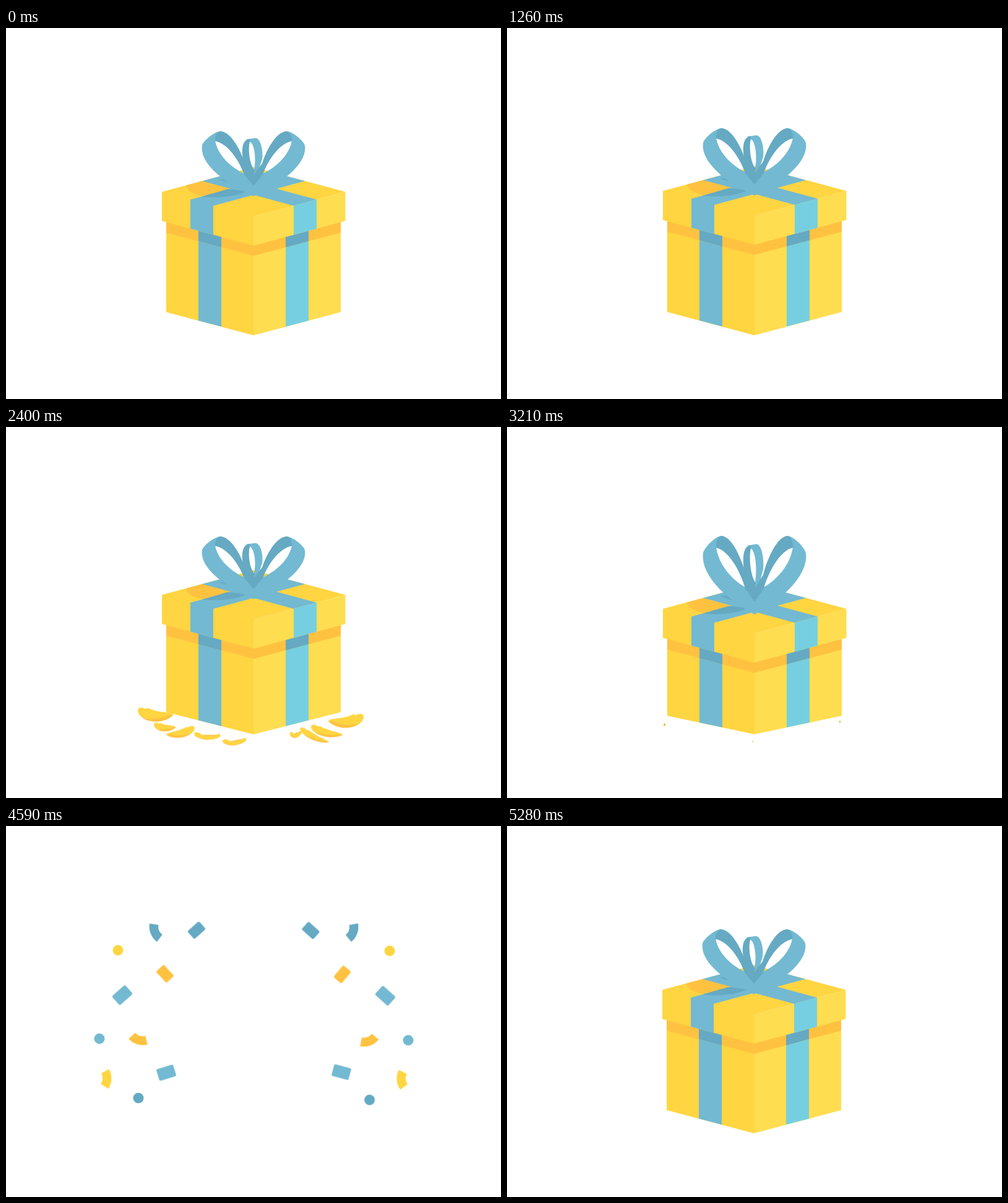
These frames come from a looping animation (800x600 px, 5310 ms). An HTML page without scripts:

```html
<!DOCTYPE html>
<html lang="en">
<head>
<meta charset="utf-8">
<title>Gift box</title>
<style>
@property --s { syntax: "<number>"; inherits: true; initial-value: 1; }
@property --bow { syntax: "<number>"; inherits: true; initial-value: 1; }

html, body { margin: 0; width: 100%; height: 100%; overflow: hidden; background: #fff; }
svg { display: block; width: 100vw; height: 100vh; }

.yellow { fill: #ffd541; }
.lemon { fill: #ffdd50; }
.orange { fill: #ffc240; }
.blue { fill: #73b9d2; }
.deep { fill: #65a9c3; }
.aqua { fill: #76cfe0; }

.hop, .squash, .confetti > *, .dust > *, .ring, .dots {
  animation: 5.31s linear infinite;
}

/* box */
.hop { animation-name: hop; }
.squash { animation-name: squash; animation-timing-function: ease-in-out; }
.body { transform-origin: 400px 497px; transform: scaleY(var(--s)); }
.lid { transform: translateY(calc((1 - var(--s)) * 145px)); }
.bow { transform-origin: 400px 262px; transform: scaleY(var(--bow)); }

@keyframes hop {
  0% { transform: none; }
  7.72%, 37.85% { transform: translate(0, 0); animation-timing-function: cubic-bezier(.333, .667, .667, 1); }
  11.86%, 42% { transform: translate(0, -160px); animation-timing-function: cubic-bezier(.333, 0, .667, .333); }
  13.56%, 43.69% { transform: translate(0, 0); }
  62.34% { transform: translate(0, 0); animation-timing-function: cubic-bezier(.333, .1, .667, .6); }
  65.16% { transform: translate(0, -520px); animation-timing-function: step-start; }
  65.17% { transform: translate(-570px, 0); }
  86.66% { transform: translate(-570px, 0); animation-timing-function: cubic-bezier(.333, .667, .667, 1); }
  100% { transform: translate(0, 0); }
}
@keyframes squash {
  0%, 1.13%, 31.26% { --s: 1; --bow: 1; }
  5.65%, 35.78% { --s: .8; --bow: 1.2; }
  6.78%, 36.91% { --s: .78; --bow: .95; }
  7.72%, 37.85% { --s: 1.08; --bow: .9; }
  11.86%, 42% { --s: 1; --bow: 1; }
  13.56%, 43.69% { --s: 1; --bow: 1.1; }
  14.12%, 44.26% { --s: .84; --bow: 1.15; }
  15.07%, 45.2% { --s: .955; --bow: .963; }
  16.76%, 46.89% { --s: 1.07; --bow: 1.03; }
  19.59%, 49.72% { --s: .96; --bow: .97; }
  21.85%, 51.98% { --s: 1.025; --bow: 1.085; }
  23.73%, 53.86% { --s: 1.01; --bow: 1.037; }
  26.55%, 56.69% { --s: 1; --bow: 1; }
  60.45% { --s: .8; --bow: 1.21; }
  61.77% { --s: .76; --bow: 1; }
  62.52% { --s: 1.08; --bow: .9; }
  65.16%, 100% { --s: 1; --bow: 1; }
}

/* confetti: --a and --p just after the burst, --z and --q once settled */
.confetti > * { animation-name: burst; animation-timing-function: cubic-bezier(.21, .54, .45, .89); }
@keyframes burst {
  0%, 62.3% { transform: translate(400px, 300px) rotate(0deg) scale(0); }
  72.88% { transform: translate(var(--a)) rotate(var(--p, 0deg)) scale(1); }
  86.44% { transform: translate(var(--z)) rotate(var(--q, 0deg)) scale(1); animation-timing-function: ease-in; }
  89.83%, 100% { transform: translate(var(--z)) rotate(var(--q, 0deg)) scale(0); }
}

/* chips thrown from the floor */
.dust > * { animation-name: throw; animation-timing-function: cubic-bezier(.3, .6, .6, 1); }
@keyframes throw {
  0%, 13.56%, 43.69%, 62.15% { transform: translate(calc(var(--x) * .75), calc(var(--y) * .75)) scale(0); }
  15.07%, 45.2%, 63.75% { transform: translate(var(--x), var(--y)) scale(1); }
  22.03%, 52.17%, 71.56%, 100% { transform: translate(calc(var(--x) * 1.35), calc(var(--y) * 1.75)) scale(0); }
}
.ring { animation-name: ring; transform-origin: 400px 480px; fill: none; stroke: #ffd541; stroke-width: 2; }
@keyframes ring {
  0%, 18.8%, 23%, 49%, 52.9%, 68.5%, 73.4%, 100% { opacity: 0; transform: scale(.95); }
  21%, 51%, 71% { opacity: 1; transform: scale(.99); }
  22.5%, 52.4%, 72.88% { opacity: 1; transform: scale(1); }
}
.dots { animation-name: dots; animation-timing-function: step-end; fill: #e9b92f; }
@keyframes dots {
  0%, 62.15%, 100% { opacity: 0; }
  59.3% { opacity: 1; }
}
</style>
</head>
<body>
<svg viewBox="0 0 800 600">
  <defs>
    <rect id="small" x="-12.5" y="-8.5" width="25" height="17" rx="2.5"/>
    <rect id="large" x="-14.2" y="-9.7" width="28.4" height="19.4" rx="2.5"/>
    <circle id="dot" r="8.5"/>
    <path id="arc" d="M-4-16A31 31 0 0 0-4 16L8.4 8.5A16.5 16.5 0 0 1 8.4-8.5Z"/>
    <g id="chip">
      <path class="orange" d="M-27 0C-18 10-6 13 8 11C18 9 25 5 29 0L10-2Z"/>
      <path class="yellow" d="M-29-6C-28-14-20-11-16-9C-12-13-8-7-2-7C6-3 20-5 28-1C20 2 10 6 0 6C-12 8-27 7-29-6Z"/>
    </g>
    <g id="curl">
      <path class="orange" d="M-21 2C-10 9 8 9 22-2L18-4Z"/>
      <path class="yellow" d="M-22 0C-18-5-14-3-10-1C0 3 12-1 19-6C24-3 20 2 12 4C0 7-14 6-22 0Z"/>
    </g>
    <g id="loop">
      <path class="blue" d="M346 167C334 169 318 184 317 190C313 214 342 241 374 259L400 272L402 255L386 236C358 223 341 201 338 182Z"/>
      <path class="deep" d="M338 183C337 175 341 168 346 167C362 167 378 194 386 219L402 240L400 255L385 237C376 212 357 186 338 183Z"/>
    </g>
  </defs>

  <g class="confetti">
    <use href="#small" class="deep" style="--a:316px,153px;--p:-27deg;--z:308px,168.5px;--q:-42deg"/>
    <use href="#small" class="deep" style="--a:485px,155px;--p:27deg;--z:492.5px,169px;--q:42deg"/>
    <use href="#arc" class="deep" style="--a:261.5px,155px;--p:-9deg;--z:241.7px,171px;--q:-22deg"/>
    <use href="#arc" class="deep" style="--a:540.5px,155px;--p:187deg;--z:559.7px,171px;--q:200deg"/>
    <use href="#dot" class="yellow" style="--a:204px,183.5px;--z:181px,201px"/>
    <use href="#dot" class="yellow" style="--a:599px,185.5px;--z:620px,202px"/>
    <use href="#small" class="orange" style="--a:273.5px,214px;--p:62deg;--z:257px,239px;--q:47deg"/>
    <use href="#small" class="orange" style="--a:530px,218.5px;--p:110deg;--z:543.5px,240px;--q:130deg"/>
    <use href="#large" class="blue" style="--a:208px,249px;--p:-26deg;--z:188px,273.5px;--q:-42deg"/>
    <use href="#large" class="blue" style="--a:595px,252px;--p:23deg;--z:613px,274.5px;--q:42deg"/>
    <use href="#dot" class="blue" style="--a:179.5px,306px;--z:151px,344px"/>
    <use href="#dot" class="blue" style="--a:623.5px,313.5px;--z:650px,346.5px"/>
    <use href="#arc" class="orange" style="--a:232.5px,314px;--p:-58deg;--z:214.6px,345px;--q:-73deg"/>
    <use href="#arc" class="orange" style="--a:570.4px,319.4px;--p:-130deg;--z:586px,347px;--q:-110deg"/>
    <use href="#arc" class="yellow" style="--a:191px,364px;--p:195deg;--z:162px,409px;--q:182deg"/>
    <use href="#arc" class="yellow" style="--a:614.3px,367px;--p:-18deg;--z:640px,410px;--q:-4deg"/>
    <use href="#large" class="blue" style="--a:272px,364.5px;--p:-2deg;--z:259px,399px;--q:-17deg"/>
    <use href="#large" class="blue" style="--a:530px,357.5px;--p:-3deg;--z:542px,398px;--q:15deg"/>
    <use href="#dot" class="deep" style="--a:234.5px,394px;--z:214px,440px"/>
    <use href="#dot" class="deep" style="--a:572.5px,406.5px;--z:587.5px,443px"/>
  </g>

  <g transform="translate(400 470)">
    <g class="dust">
      <g style="--x:-158px;--y:-5px"><use href="#chip"/></g>
      <g style="--x:-143px;--y:15px"><use href="#chip" transform="scale(.62)"/></g>
      <g style="--x:-118px;--y:24px"><use href="#chip" transform="rotate(-8) scale(-.82 .72)"/></g>
      <g style="--x:-75px;--y:29px"><use href="#curl" transform="rotate(8)"/></g>
      <g style="--x:-31px;--y:38px"><use href="#curl" transform="scale(.9 1)"/></g>
      <g style="--x:68px;--y:26px"><use href="#curl" transform="scale(.45 1)"/></g>
      <g style="--x:98px;--y:30px"><use href="#chip" transform="rotate(22) scale(.9 .55)"/></g>
      <g style="--x:118px;--y:23px"><use href="#chip" transform="rotate(10) scale(.92 .7)"/></g>
      <g style="--x:149px;--y:5px"><use href="#chip" transform="scale(-1 1)"/></g>
    </g>
  </g>
  <g class="ring">
    <path stroke-dasharray="9 6 10 12 6 6 4 11 3 14 2 25 3 17 2 90" d="M202 462C185 460 177 462 178 477C184 500 215 522 240 537"/>
    <path stroke-dasharray="8 4 11 14 5 6 4 11 5 16 2 28 4 17 2 90" d="M586 478C600 479 608 482 606 494C598 515 570 535 527 553"/>
  </g>
  <g class="dots">
    <ellipse cx="254.500" cy="481.500" rx="1.300" ry="2.300" transform="rotate(30 254.500 481.500)"/>
    <circle cx="538" cy="476.500" r="1.400"/>
    <circle cx="397" cy="508.500" r="1"/>
  </g>

  <g class="hop"><g class="squash">
    <g class="body">
      <path class="yellow" d="M259 300L400 338V497L259 459.500Z"/>
      <path class="lemon" d="M541 300L400 338V497L541 459.500Z"/>
      <path class="blue" d="M311 314L348 324V483L311 473.300Z"/>
      <path class="aqua" d="M489 314L452 324V483L489 473.300Z"/>
    </g>
    <g class="lid">
      <path class="orange" d="M259 305L400 343L541 305V331L400 368.500L259 331Z"/>
      <path class="deep" d="M311 318L348 328V354.700L311 344.800ZM489 318L452 328V354.700L489 344.800Z"/>
      <path class="yellow" d="M252 265L400 225L548.500 265L400 305V352L252 312Z"/>
      <path class="lemon" d="M400 305L548.500 265V312L400 352Z"/>
      <path class="orange" d="M291 254.500C292 266 312 273 340 274L372 262L317 247.500Z"/>
      <path class="blue" d="M298 277.400L446 237.400L483 247.400L335 287.400V334.400L298 324.400Z"/>
      <path class="blue" d="M317 247.400L354 237.400L502 277.400L465 287.400Z"/>
      <path class="aqua" d="M465 287.400L502 277.400V324.400L465 334.400Z"/>
      <path class="deep" d="M317 272.500C345 276 372 272 390 264L358 260.500ZM342 244C350 246 356 243 360 240L388 250L372 254Z"/>
      <g class="bow">
        <path class="blue" d="M388 180L403 178C412 178 416 200 414 212L404 242L401 229C405 210 401 186 394 184Z"/>
        <path class="deep" d="M394 180C379 179 380 206 386 225L400 250L402 230C393 220 391 195 394 184Z"/>
        <use href="#loop"/>
        <use href="#loop" transform="matrix(-1 0 0 1 800 0)"/>
      </g>
    </g>
  </g></g>
</svg>
</body>
</html>
```
